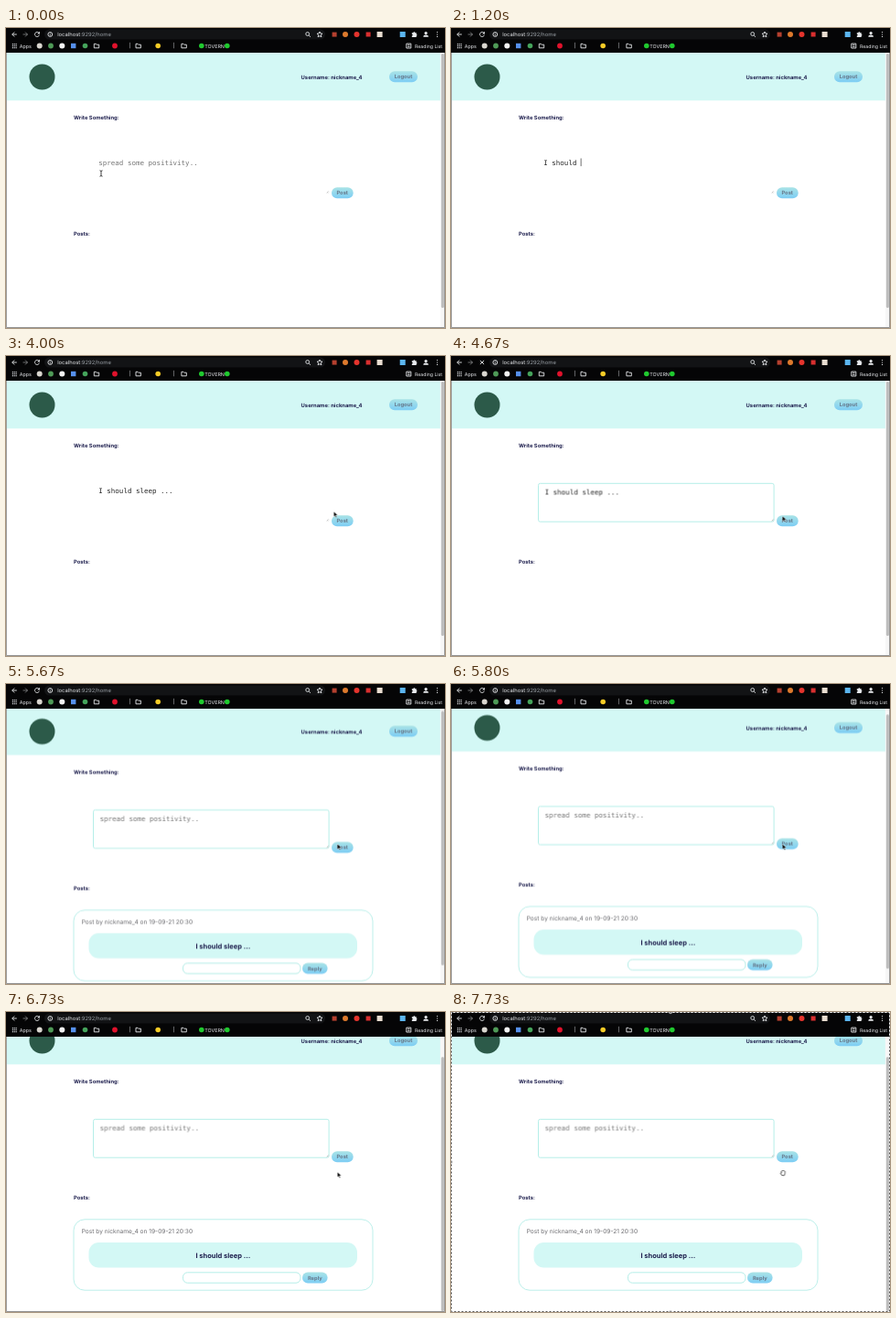
An HTML page for the animation above (7990 ms loop, 480x328 px).

```html
<!DOCTYPE html>
<html lang="en">
<head>
<meta charset="utf-8">
<title>Post page</title>
<style>
html, body { margin: 0; width: 100%; height: 100%; overflow: hidden; background: #fff; }
svg { display: block; width: 480px; height: 328px; }
text { font-family: Inter, "Open Sans", sans-serif; text-rendering: geometricPrecision; white-space: pre; }
.bold { font-size: 5.85px; font-weight: 700; fill: #1d1e4d; }
.label { font-size: 5.75px; font-weight: 700; fill: #66788a; text-anchor: middle; }
.mono text { font: 7.5px "DejaVu Sans Mono", monospace; fill: #262626; }
.mono .hint { fill: #777; }
.bar text { font-size: 5.4px; fill: #e8eaed; }
.line { fill: none; stroke: #e8eaed; stroke-width: .9; }
.edge { fill: #fff; stroke: #b5eee8; }

/* One 7990 ms loop; every part shares it and changes in hard steps */
.scroll, .thumb, .field, .hint, .typed, .cover, .caret, .border, .card,
.reload, .stop, .ibeam, .arrow, .hand, .select { animation: 7990ms step-end infinite; }
.pointer { animation: move 7990ms infinite; }
.scroll { --dir: -1; animation-name: scroll; }
.thumb { --dir: .96; animation-name: scroll; }
.field { animation-name: inset; }
.hint { animation-name: hint; }
.typed { animation-name: typed; }
.cover { --c: 4.515px; animation-name: type; }
.caret { animation-name: blink; }
.border { animation-name: blur; }
.card { animation-name: loaded; }
.reload { animation-name: reload; }
.stop { animation-name: stop; }
.ibeam { animation-name: ibeam; }
.arrow { animation-name: arrow; }
.hand, .select { animation-name: select; }

@keyframes scroll {
  0% { transform: none; }
  70.96% { transform: translateY(calc(var(--dir) * 1.6px)); }
  71.79% { transform: translateY(calc(var(--dir) * 5.5px)); }
  72.62% { transform: translateY(calc(var(--dir) * 11px)); }
  73.46% { transform: translateY(calc(var(--dir) * 16.5px)); }
  74.30% { transform: translateY(calc(var(--dir) * 19.6px)); }
  75.13% { transform: translateY(calc(var(--dir) * 21.3px)); }
  75.96%, 100% { transform: translateY(calc(var(--dir) * 22px)); }
}
@keyframes type {
  0%, .87% { transform: translateX(var(--c)); }
  2.50% { transform: translateX(calc(2 * var(--c))); }
  4.12% { transform: translateX(calc(3 * var(--c))); }
  5.00% { transform: translateX(calc(4 * var(--c))); }
  6.63% { transform: translateX(calc(5 * var(--c))); }
  8.38% { transform: translateX(calc(6 * var(--c))); }
  10.88% { transform: translateX(calc(7 * var(--c))); }
  12.51% { transform: translateX(calc(8 * var(--c))); }
  14.14% { transform: translateX(calc(9 * var(--c))); }
  16.64% { transform: translateX(calc(10 * var(--c))); }
  19.14% { transform: translateX(calc(11 * var(--c))); }
  20.90% { transform: translateX(calc(12 * var(--c))); }
  21.65% { transform: translateX(calc(14 * var(--c))); }
  25.03% { transform: translateX(calc(15 * var(--c))); }
  26.65% { transform: translateX(calc(16 * var(--c))); }
  29.16% { transform: translateX(calc(17 * var(--c))); }
  30.91%, 100% { transform: translateX(calc(18 * var(--c))); }
}
@keyframes blink {
  0%, 43.42% { opacity: 1; }
  37.17%, 49.68%, 100% { opacity: 0; }
}
@keyframes inset { 0% { transform: none; } 55.94%, 100% { transform: translate(1.4px, 1.5px); } }
@keyframes blur { 0% { opacity: 0; } 55.94%, 100% { opacity: 1; } }
@keyframes hint { 0%, 63.45%, 100% { opacity: 1; } .87% { opacity: 0; } }
@keyframes typed { 0%, 63.45%, 100% { opacity: 0; } .87% { opacity: 1; } }
@keyframes loaded { 0% { opacity: 0; } 63.45%, 100% { opacity: 1; } }
@keyframes reload { 0%, 64.20%, 100% { opacity: 1; } 55.94% { opacity: 0; } }
@keyframes stop { 0%, 64.20%, 100% { opacity: 0; } 55.94% { opacity: 1; } }
@keyframes ibeam { 0%, 35.91% { opacity: 1; } .87%, 45.93%, 100% { opacity: 0; } }
@keyframes arrow { 0%, 95.99%, 100% { opacity: 0; } 45.93% { opacity: 1; } }
@keyframes select { 0% { opacity: 0; } 95.99%, 100% { opacity: 1; } }
@keyframes move {
  0%, 35.90% { transform: translate(104px, 159px); }
  35.91% { transform: translate(112px, 158px); animation-timing-function: ease-in-out; }
  45.05% { transform: translate(347px, 172px); animation-timing-function: ease-out; }
  50.06% { transform: translate(358.4px, 170px); animation-timing-function: ease-in-out; }
  55.06%, 100% { transform: translate(362.4px, 175px); }
}
</style>
</head>
<body>
<svg viewBox="0 0 480 328">
  <defs>
    <linearGradient id="sky" x2="0" y2="1">
      <stop stop-color="#a9e3e6"/><stop offset="1" stop-color="#7dcdf4"/>
    </linearGradient>
    <path id="folder" d="M-2.7 -2.2h2l.8 .9h2.6v3.6h-5.4z" class="line"/>
  </defs>

  <rect width="480" height="328" fill="#fff"/>

  <g class="scroll">
    <rect x="1" y="20" width="474" height="59.3" fill="#d3f8f5"/>
    <circle cx="39.5" cy="53.5" r="14" fill="#2c5a49"/>
    <text class="bold" x="322.6" y="55.6">Username: nickname_4</text>
    <rect x="419" y="47.2" width="31" height="12" rx="6" fill="url(#sky)"/>
    <text class="label" x="434.5" y="55.2">Logout</text>

    <text class="bold" x="74" y="100.3">Write Something:</text>
    <rect class="border edge" x="95.5" y="139.3" width="257.6" height="41.9" rx="2"/>
    <path d="M350.8 180.3l1.8-1.8M352 180.5l.7-.7" stroke="#888" stroke-width=".5"/>
    <g class="field mono">
      <text class="hint" x="101.3" y="149.5">spread some positivity..</text>
      <g class="typed">
        <text x="101.3" y="149.5">I should sleep ...</text>
        <g class="cover">
          <rect x="101.4" y="141.5" width="90" height="11" fill="#fff"/>
          <rect class="caret" x="101.3" y="142.5" width=".7" height="8.6" fill="#333"/>
        </g>
      </g>
    </g>
    <rect x="356" y="174.2" width="23.7" height="12" rx="6" fill="url(#sky)"/>
    <text class="label" x="367.7" y="182.2">Post</text>
    <text class="bold" x="74" y="227.1">Posts:</text>

    <g class="card">
      <rect class="edge" x="74" y="248.8" width="327" height="77.4" rx="12" stroke-width=".9"/>
      <text x="82.7" y="263.5" font-size="6.6" fill="#6c6c70">Post by nickname_4 on 19-09-21 20:30</text>
      <rect x="90.5" y="274" width="293.5" height="27.4" rx="11" fill="#d3f8f5"/>
      <text x="237.3" y="290.7" font-size="7.5" font-weight="700" fill="#1d1e4d" text-anchor="middle">I should sleep ...</text>
      <rect class="edge" x="193.5" y="306.8" width="128.5" height="11.4" rx="5"/>
      <rect x="324" y="306.6" width="27.6" height="12" rx="6" fill="url(#sky)"/>
      <text class="label" x="337.8" y="314.6">Reply</text>
    </g>
  </g>

  <rect x="474.8" y="27" width="5.2" height="301" fill="#f7f7f7"/>
  <rect class="thumb" x="475.9" y="28" width="3" height="278" rx="1.5" fill="#bdbdbd"/>
  <path d="M.4 27v300.5h479.2v-300.5" fill="none" stroke="#777" stroke-width=".8"/>

  <g class="bar">
    <rect width="480" height="27" fill="#050506"/>
    <rect x="42" y="1.5" width="307" height="11" rx="5.5" fill="#121315"/>
    <path class="line" d="M11.8 7h-5M9.2 4.5l-2.5 2.5l2.5 2.5"/>
    <path class="line" d="M18.5 7h5M21 4.5l2.5 2.5l-2.5 2.5" opacity=".5"/>
    <g class="reload">
      <path class="line" d="M36.1 5.6a2.5 2.5 0 1 0 .3 2.1"/>
      <path d="M36.9 3.8v2.7h-2.7z" fill="#e8eaed"/>
    </g>
    <path class="stop line" d="M31.9 4.9l4.2 4.2M36.1 4.9l-4.2 4.2"/>
    <circle class="line" cx="48.3" cy="7" r="2.4" stroke-width=".6"/>
    <path class="line" d="M48.3 6.7v1.7M48.3 5.3v.6" stroke-width=".6"/>
    <text x="56.2" y="9" style="font-size:5.85px">localhost<tspan fill="#9aa0a6">:9292/home</tspan></text>
    <circle class="line" cx="329.7" cy="6.5" r="1.9"/>
    <path class="line" d="M331.2 8l1.8 1.8"/>
    <path class="line" stroke-width=".6" d="M343 4l.9 2l2.1 .2l-1.6 1.5l.5 2.1l-1.9-1.1l-1.9 1.1l.5-2.1l-1.6-1.5l2.1-.2z"/>
    <rect x="356.6" y="4.6" width="5" height="5" fill="#b5402f"/>
    <circle cx="371" cy="7" r="3" fill="#dd7a2d"/>
    <circle cx="383.5" cy="7" r="3" fill="#e5342d"/>
    <rect x="393.6" y="4.5" width="5" height="5" fill="#d92f2f"/>
    <rect x="405.6" y="4" width="6" height="6" fill="#e9ddd0"/>
    <rect x="430.7" y="4" width="6" height="6" fill="#5bb5ef"/>
    <path d="M443.8 5.2h1.5a1 1 0 0 1 2 0h1.4v1.6a1 1 0 0 1 0 1.9v1.3h-4.9v-1.5a.9 .9 0 0 0 0-1.8z" fill="#e8eaed"/>
    <path d="M456.3 9.8q0-2.2 2.8-2.2t2.8 2.2z" fill="#e8eaed"/>
    <circle cx="459.1" cy="5.6" r="1.6" fill="#e8eaed"/>
    <path d="M471.5 4.6v5.6" stroke="#e8eaed" stroke-width="1.2" stroke-linecap="round" stroke-dasharray="0 2.4"/>

    <path d="M6.8 17.6h5M6.8 19.6h5M6.8 21.6h5" stroke="#c8cace" stroke-width="1.2" stroke-dasharray="1.2 .7"/>
    <text x="14.8" y="21.5">Apps</text>
    <circle cx="36.7" cy="19.5" r="3" fill="#d9d6cf"/>
    <circle cx="49" cy="19.5" r="2.9" fill="#4f9a57"/>
    <circle cx="61.3" cy="19.5" r="3" fill="#f2f2f2"/>
    <rect x="71" y="16.8" width="5.4" height="5.4" fill="#5690ec"/>
    <circle cx="86.5" cy="19.5" r="2.8" fill="#45a35b"/>
    <use href="#folder" x="99" y="19.5"/>
    <circle cx="119" cy="19.5" r="2.9" fill="#e0122c"/>
    <text x="134.7" y="21.3">|</text>
    <use href="#folder" x="144.7" y="19.5"/>
    <circle cx="166.2" cy="19.5" r="2.8" fill="#f6cc27"/>
    <text x="182.8" y="21.3">|</text>
    <use href="#folder" x="194.6" y="19.5"/>
    <circle cx="213.8" cy="19.5" r="2.8" fill="#20c92f"/>
    <text x="217.2" y="21.5">TOVERN</text>
    <circle cx="241.8" cy="19.5" r="2.8" fill="#20c92f"/>
    <path d="M437.8 17.1h5v4.9h-5zM439.2 18.7h2.3M439.2 20.4h2.3" class="line" stroke-width=".7"/>
    <text x="447" y="21.5" style="font-size:5.2px">Reading List</text>
  </g>

  <g class="select">
    <rect x=".5" y=".5" width="479" height="327" fill="none" stroke="#fff"/>
    <rect x=".5" y=".5" width="479" height="327" fill="none" stroke="#555" stroke-dasharray="2 2"/>
    <g fill="#888" stroke="#fff" stroke-width=".5">
      <circle cx="240" r="1.8"/><circle cx="240" cy="328" r="1.8"/>
      <circle cy="164" r="1.8"/><circle cx="480" cy="164" r="1.8"/>
    </g>
  </g>

  <g class="pointer">
    <path class="ibeam" d="M-1.5 -3.2q1.5 0 1.5 1v4.4q0 1-1.5 1M1.5 -3.2q-1.5 0-1.5 1M0 2.2q0 1 1.5 1" fill="none" stroke="#111" stroke-width=".8"/>
    <path class="arrow" d="M0 0v5.6l1.3-1.2l.9 2l1-.4l-.9-2h1.8z" fill="#000" stroke="#fff" stroke-width=".4"/>
    <path class="hand" d="M-1 3.4l-1.1-2.2q.2-.8 1.1 0l-.2-2.2q.6-.8 1.1 0q.5-1.1 1.1-.2q.7-.7 1.1 .3q.8-.3.8 .6l-.2 2.2l-.8 2z" fill="#fff" stroke="#222" stroke-width=".7"/>
  </g>
</svg>
</body>
</html>
```
